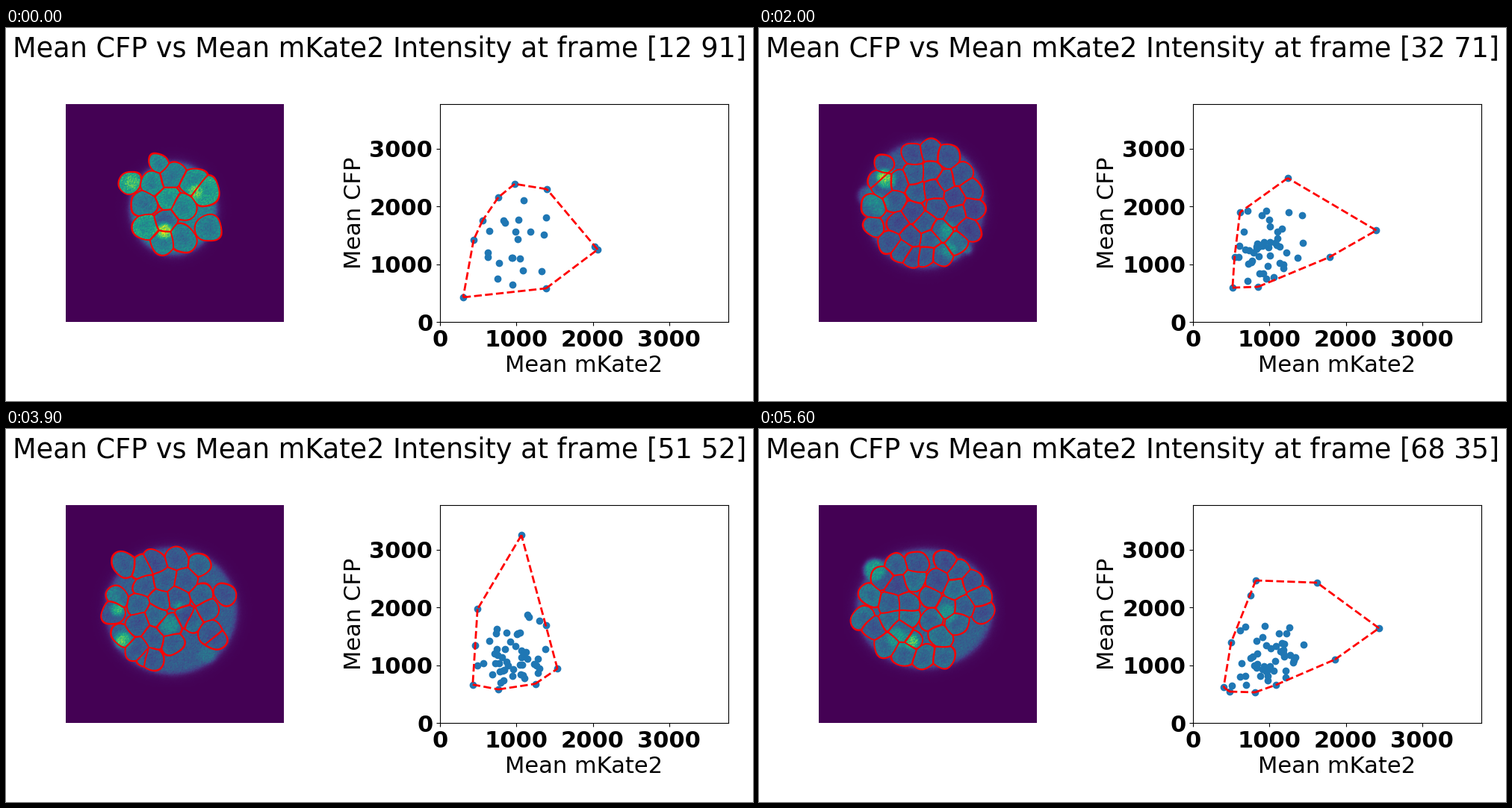
Write a matplotlib script that moves like this. It is 1000x500 px and loops after 5700 ms.

```python
import numpy as np
import matplotlib.pyplot as plt
from matplotlib.animation import FuncAnimation

STEPS, LIMIT = 57, 3774
LEFT, BOTTOM, WIDTH, HEIGHT = 581, 394, 386, 292   # plot box on the stage
IMG_X, IMG_Y, IMG_SIZE = 80, 102, 292
X0, X1, Y0, Y1 = 112, 330, 140, 346                # part of the stage holding the clump

keys = []


def rows_of(flat, width):
    return np.array(flat, float).reshape(-1, width)


def hull(points):
    def chain(pts):
        out = []
        for p in pts:
            while len(out) > 1:
                (ax, ay), (bx, by) = out[-2:]
                if (bx - ax) * (p[1] - ay) - (by - ay) * (p[0] - ax) > 0:
                    break
                out.pop()
            out.append(p)
        return out[:-1]
    pts = sorted(map(tuple, points))
    return np.array(chain(pts) + chain(pts[::-1]))


def pack(body, pitch, buds, gaps, rng):
    """Cells in rings inside an ellipse, plus the listed buds, minus the gaps."""
    cx, cy, rx, ry = body
    cells = list(buds)
    inset = 0.56 * pitch
    while min(rx, ry) - inset > 0:
        a, b = rx - inset, ry - inset
        count = max(1, round(np.pi * (a + b) / pitch))
        start = rng.uniform(0, 2 * np.pi)
        for t in start + 2 * np.pi * np.arange(count) / count:
            x, y = (cx + a * np.cos(t), cy + b * np.sin(t)) + rng.normal(0, 1.8, 2)
            crowded = any(np.hypot(x - u, y - v) < 0.5 * (r + 0.6 * pitch) for u, v, r in buds)
            hidden = any(np.hypot(x - u, y - v) < r for u, v, r in gaps)
            if not crowded and not hidden:
                cells.append((x, y, pitch * rng.uniform(0.58, 0.66)))
        inset += 0.92 * pitch
    return np.array(cells)


def scatter_inside(rim, count, mid, rng):
    """Rim points and a random cloud within them."""
    edge = hull(rim)
    side = np.roll(edge, -1, 0) - edge
    length = np.hypot(*side.T)
    pts = list(rim)
    while len(pts) < len(rim) + count:
        p = rng.normal((677, mid), (25, 27))
        to = p - edge
        if ((side[:, 0] * to[:, 1] - side[:, 1] * to[:, 0]) / length).min() > 3:
            pts.append(p)
    return np.array(pts)


def key(step, base, body, pitch, buds, gaps, glows, rim, count, mid):
    """Pose at one step, in stage pixels. Glows are x, y, radius, level."""
    rng = np.random.default_rng(step)
    cells = pack(body, pitch, rows_of(buds, 3), rows_of(gaps, 3), rng)
    level = base * rng.uniform(0.78, 1.25, len(cells))
    keys.append(dict(step=step, base=base, body=np.array(body, float),
                     glows=rows_of(glows, 4), cells=np.column_stack([cells, level]),
                     dots=scatter_inside(rows_of(rim, 2), count, mid, rng)))


key(0, 0.46, (224, 242, 57, 61), 29,
    [204, 181, 13, 166, 207, 15, 267, 219, 20, 272, 269, 18], [],
    [168, 207, 9, .72, 254, 219, 9, .75, 212, 258, 10, .28, 212, 272, 10, .85],
    [612, 361, 626, 284, 638, 258, 659, 227, 681, 209, 724, 216, 788, 293,
     792, 297, 723, 349], 20, 290)

key(7, 0.36, (229, 238, 62, 74), 25,
    [168, 206, 16, 162, 238, 18, 195, 173, 15, 218, 170, 15, 290, 240, 11],
    [270, 200, 34, 234, 241, 18],
    [172, 205, 9, .9, 258, 206, 9, .8, 234, 240, 19, .19, 278, 210, 13, .5],
    [685, 177, 805, 254, 744, 338, 662, 348, 636, 338, 638, 292, 653, 231], 31, 302)

key(15, 0.28, (222, 236, 76, 82), 25,
    [167, 178, 9, 170, 206, 17, 159, 236, 17, 151, 261, 12, 206, 308, 15], [],
    [170, 203, 12, 1, 253, 271, 10, .72, 255, 297, 9, .72, 160, 236, 14, .57],
    [666, 165, 845, 249, 757, 314, 680, 349, 633, 355, 637, 320, 639, 258], 43, 299)

key(26, 0.25, (222, 238, 83, 87), 26,
    [168, 184, 18, 145, 225, 13], [232, 330, 20, 195, 178, 18],
    [166, 198, 8, .95, 145, 225, 12, .56, 256, 290, 20, .46, 279, 297, 5, .75],
    [640, 219, 697, 233, 739, 246, 755, 250, 796, 290, 770, 307, 658, 345,
     625, 348, 628, 308], 46, 310)

key(34, 0.28, (221, 245, 86, 84), 27,
    [163, 183, 18, 145, 224, 13, 299, 219, 13], [264, 178, 36, 290, 258, 18],
    [151, 242, 7, .88, 153, 287, 5, .9, 144, 222, 9, .58, 270, 302, 11, .48],
    [687, 133, 713, 230, 722, 267, 734, 321, 702, 351, 650, 345, 623, 333,
     622, 315, 630, 289], 45, 306)

key(43, 0.29, (222, 243, 87, 84), 26,
    [155, 181, 17, 139, 251, 15, 157, 281, 15, 163, 305, 11, 298, 248, 18],
    [257, 300, 37, 215, 172, 15],
    [157, 282, 10, .96, 148, 242, 8, .74, 219, 263, 12, .65, 231, 238, 5, .72],
    [689, 151, 726, 261, 734, 301, 737, 324, 709, 340, 662, 347, 620, 341,
     625, 301, 632, 241], 47, 305)

key(56, 0.31, (222, 241, 90, 79), 26,
    [139, 254, 16, 250, 178, 16, 204, 281, 14], [284, 297, 32, 151, 183, 17],
    [204, 285, 9, .74, 155, 189, 14, .54, 185, 280, 13, .52, 252, 247, 12, .5],
    [665, 203, 747, 206, 830, 267, 771, 309, 692, 343, 664, 353, 630, 352,
     622, 346, 632, 286, 658, 223], 46, 305)


def pair(a, b):
    """Link the rows of a and b, closest first."""
    d = np.hypot(*(a[:, None, :2] - b[None, :, :2]).transpose(2, 0, 1))
    links = []
    for _ in range(min(len(a), len(b))):
        i, j = np.unravel_index(d.argmin(), d.shape)
        links.append((i, j))
        d[i], d[:, j] = np.inf, np.inf
    return np.array(links).T


def blend(a, b, links, u):
    """Move linked rows from a to b; the others drop out or come in one by one."""
    i, j = links
    lost, new = np.delete(a, i, 0), np.delete(b, j, 0)
    return np.vstack([a[i] * (1 - u) + b[j] * u,
                      lost[round(u * len(lost)):], new[:round(u * len(new))]])


def sigmoid(z):
    return 1 / (1 + np.exp(np.clip(-z, -40, 40)))


yy, xx = np.mgrid[Y0:Y1, X0:X1].astype(np.float32) + 0.5
wx = (xx + 1.5 * np.sin(yy / 8) + 0.7 * np.sin(xx / 5)).astype(np.float32)
wy = (yy + 1.5 * np.sin(xx / 7) + 0.7 * np.sin(yy / 5)).astype(np.float32)
viridis = plt.get_cmap("viridis")
RED = np.array([1.0, 0, 0])


def clump(cells, base, body, glows, rng):
    """Colour picture of the cells with red outlines."""
    cx, cy, rx, ry = body
    gap = (np.hypot((xx - cx) / rx, (yy - cy) / ry) - 1) * min(rx, ry)
    val = 0.85 * base * sigmoid(-gap / 2) + 0.05 * np.exp(-np.maximum(gap, 0) / 8)

    x, y, r, level = cells.astype(np.float32).T
    power = ((wx - x[:, None, None]) ** 2 + (wy - y[:, None, None]) ** 2
             - (r ** 2)[:, None, None])
    rows, cols = np.indices(xx.shape)
    first = power.argmin(0)
    p1 = power[first, rows, cols]
    power[first, rows, cols] = np.inf
    second = power.argmin(0)
    p2 = power[second, rows, cols]

    dist = np.sqrt(np.maximum(p1 + r[first] ** 2, 1))
    inside = p1 < 0
    shade = level[first] * (1.05 - 0.2 * np.exp(-(dist / (0.5 * r[first])) ** 2))
    val = np.where(inside, shade, val)
    for gx, gy, gr, glow, weight in glows:
        spot = sigmoid((gr - np.hypot(xx - gx, yy - gy)) / 1.6)
        val += (glow - val) * spot * weight

    grain = rng.normal(0, 1, xx.shape)
    grain += np.roll(grain, 1, 0) + np.roll(grain, 1, 1)
    rgb = viridis(np.clip(val * (1 + 0.05 * grain), 0, 1))[..., :3]

    outer = np.abs(p1) / (2 * dist)
    apart = np.hypot(x[first] - x[second], y[first] - y[second])
    inner = np.where(inside, (p2 - p1) / (2 * np.maximum(apart, 1)), 9)
    ink = np.clip(1.6 - np.minimum(outer, inner), 0, 1)[..., None]
    return rgb * (1 - ink) + RED * ink


times = [k["step"] for k in keys]
links = [{part: pair(a[part], b[part]) for part in ("cells", "dots")}
         for a, b in zip(keys, keys[1:])]

plt.rcParams.update({"font.family": "DejaVu Sans", "font.size": 22})
fig = plt.figure(figsize=(10, 5), dpi=100)
title = fig.suptitle("")

photo_ax = fig.add_axes([0.08, 0.212, 0.292, 0.584])
photo_ax.axis("off")
canvas = np.ones((IMG_SIZE, IMG_SIZE, 3)) * viridis(0.0)[:3]
photo = photo_ax.imshow(canvas, interpolation="nearest", aspect="auto")

ax = fig.add_axes([0.581, 0.212, 0.386, 0.584])
ticks = range(0, LIMIT, 1000)
ax.set(xlim=(0, LIMIT), ylim=(0, LIMIT), xlabel="Mean mKate2", ylabel="Mean CFP",
       xticks=ticks, yticks=ticks)
for label in ax.get_xticklabels() + ax.get_yticklabels():
    label.set_fontweight("bold")
dots = ax.scatter([], [], color="C0")
ring, = ax.plot([], [], "r--", lw=2)


def update(n):
    s = min(np.searchsorted(times, n, "right") - 1, len(keys) - 2)
    a, b = keys[s], keys[s + 1]
    u = (n - a["step"]) / (b["step"] - a["step"])
    rng = np.random.default_rng(n)
    sway = np.sin(np.pi * u)

    cells = blend(a["cells"], b["cells"], links[s]["cells"], u)
    cells[:, :2] += rng.normal(0, 0.8 * sway, (len(cells), 2))
    glows = [(*g, w) for k, w in ((a, 1 - u), (b, u)) if w > 0 for g in k["glows"]]
    base = a["base"] * (1 - u) + b["base"] * u
    body = a["body"] * (1 - u) + b["body"] * u
    picture = canvas.copy()
    picture[Y0 - IMG_Y:Y1 - IMG_Y, X0 - IMG_X:X1 - IMG_X] = clump(
        cells, base, body, glows, rng)
    photo.set_data(np.clip(picture, 0, 1))

    pts = blend(a["dots"], b["dots"], links[s]["dots"], u)
    pts += rng.normal(0, 3 * sway, pts.shape)
    pts = (pts - (LEFT, BOTTOM)) * (LIMIT / WIDTH, -LIMIT / HEIGHT)
    dots.set_offsets(pts)

    # each side is its own dashed stroke
    edge = hull(pts)
    sides = np.stack([edge, np.roll(edge, -1, 0), np.full_like(edge, np.nan)], 1)
    ring.set_data(*sides.reshape(-1, 2).T)

    title.set_text(f"Mean CFP vs Mean mKate2 Intensity at frame [{12 + n} {91 - n}]")
    return photo, dots, ring, title


anim = FuncAnimation(fig, update, frames=STEPS, interval=100,
                     init_func=lambda: update(0), repeat=True, repeat_delay=0)
plt.show()
```
